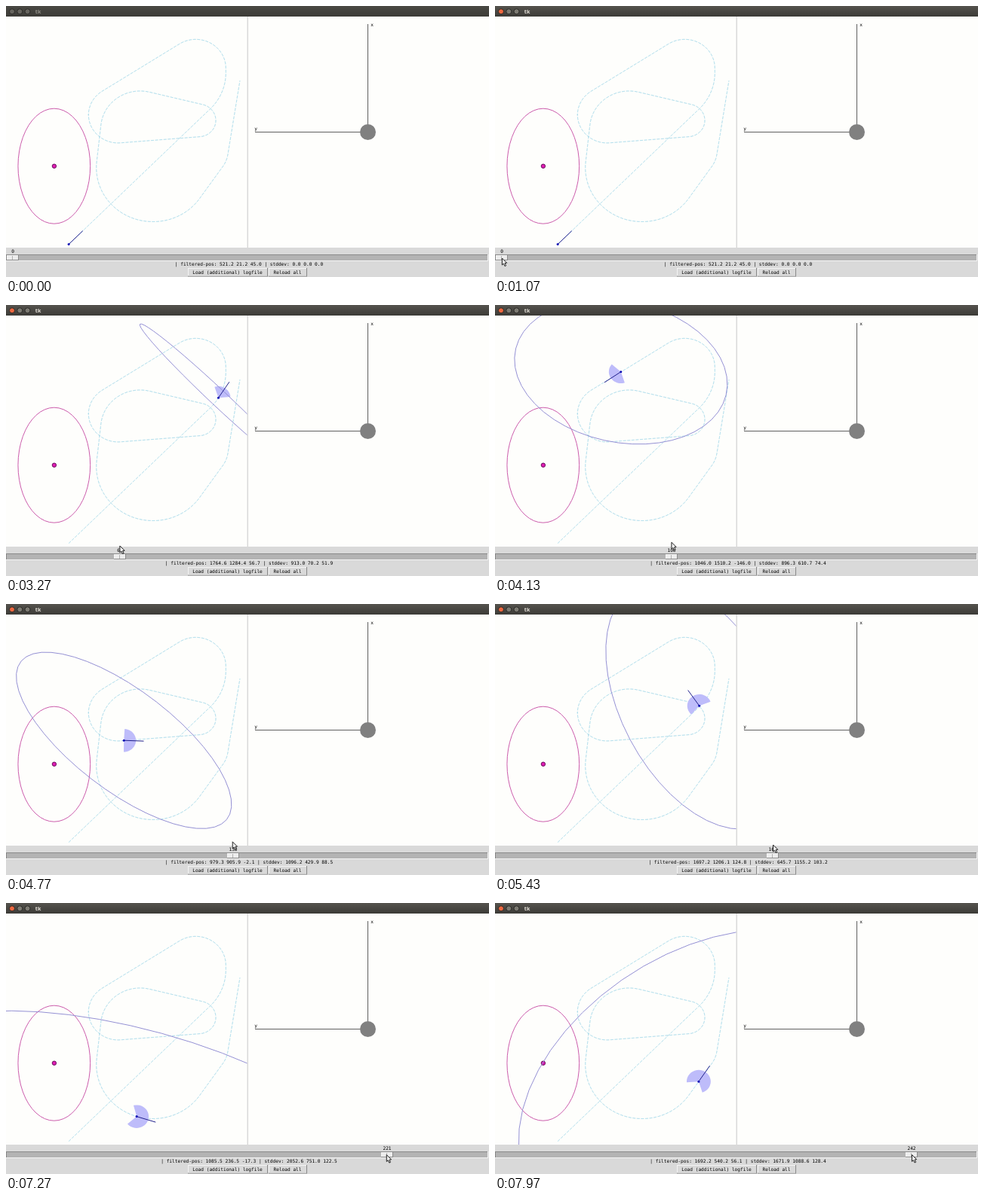
An HTML page with a canvas for the animation above (8000 ms loop, 640 by 360 pixels).

```html
<!DOCTYPE html>
<html lang="en">
<head>
<meta charset="utf-8">
<title>tk</title>
<style>
html, body { margin: 0; width: 100%; height: 100%; overflow: hidden; background: #d9d9d9; }
canvas { display: block; width: 640px; height: 360px; }
</style>
</head>
<body>
<canvas id="stage" width="640" height="360"></canvas>
<script>
const ctx = document.getElementById('stage').getContext('2d');
const LOOP = 8000, FOCUS = 870, ENTER = 380, GRAB = 1100;
const WIDTH = 155, GRAIN = 4;
const RAD = Math.PI / 180;
const MONO = '6.17px "DejaVu Sans Mono", monospace';
const FACE = '#d9d9d9', LIGHT = '#f4f4f4', SHADE = '#8a8a8a';

// Robot state at a few slider stops: pose is x, y, heading;
// spread is both axes of the error ellipse, its tilt, and the heading deviation
const KEYS = [
  { time: 1660, step: 12, pose: [521.2, 21.2, 45] },
  { time: 2030, step: 18, pose: [665.4, 165, 44.9], spread: [32.9, 23, -44.9, 17] },
  { time: 3270, step: 63, pose: [1764.6, 1284.4, 56.7], spread: [913, 70.2, -44.5, 51.9] },
  { time: 4130, step: 100, pose: [1046, 1510.2, -146], spread: [896.3, 610.7, -13, 74.4] },
  { time: 5430, step: 160, pose: [1697.2, 1206.1, 124.8], spread: [645.7, 1155.2, 26.8, 103.2] },
  { time: 6570, step: 199, pose: [767.3, 856.2, -96.4], spread: [614.1, 1444.9, 32, 116.1] },
  { time: 7970, step: 242, pose: [1692.2, 540.2, 56.1], spread: [1671.9, 1088.6, 36, 128.4] }
];

// Track corners on screen, each rounded by a left turn of the given radius in mm
const CORNERS = [
  [83.1, 316.6, 0], [291.3, 116.8, 440], [291.3, 12.7, 250], [109.3, 124.3, 246], [109.3, 185.1, 246],
  [278, 172, 142], [278, 135, 142], [132.4, 100.8, 327], [111, 286.5, 468], [234.3, 286.5, 468],
  [292.5, 206, 250], [310, 99, 0]
];

const toScreen = ([x, y]) => [x * .1595, 319.8 - y * .153];
const toWorld = ([x, y]) => [x / .1595, (319.8 - y) / .153];
const lerp = (a, b, u) => a + (b - a) * u;
const near = (a, period) => a - period * Math.round(a / period);
const dist = (p, q) => Math.hypot(q[0] - p[0], q[1] - p[1]);
const aim = (p, q) => Math.atan2(q[1] - p[1], q[0] - p[0]);
const polar = (p, r, a) => [p[0] + r * Math.cos(a), p[1] + r * Math.sin(a)];
const mul = (A, B) => A.map(r => B[0].map((_, j) => r.reduce((s, v, k) => s + v * B[k][j], 0)));
const flip = A => A[0].map((_, j) => A.map(r => r[j]));
const add = (A, B) => A.map((r, i) => r.map((v, j) => v + B[i][j]));

function ramp(keys, t) {
  if (t <= keys[0][0]) return keys[0][1];
  for (let i = 1; i < keys.length; i++) {
    const [t0, v0] = keys[i - 1], [t1, v1] = keys[i];
    if (t <= t1) return lerp(v0, v1, (t - t0) / (t1 - t0));
  }
  return keys[keys.length - 1][1];
}

function roundCorners(corners) {
  const pts = corners.map(toWorld), last = pts.length - 1, out = [pts[0]];
  for (let i = 1; i < last; i++) {
    const r = corners[i][2];
    const from = aim(pts[i - 1], pts[i]);
    const turn = near(aim(pts[i], pts[i + 1]) - from, 2 * Math.PI);
    const entry = polar(pts[i], -r * Math.tan(turn / 2), from);
    const hub = polar(entry, r, from + Math.PI / 2);
    for (let k = 0; k <= 24; k++) out.push(polar(hub, r, from - Math.PI / 2 + turn * k / 24));
  }
  return [...out, pts[last]];
}

// Points at even distances along a line
function resample(line, gap) {
  const out = [line[0]];
  let left = gap;
  for (let i = 1; i < line.length; i++) {
    const len = dist(line[i - 1], line[i]), a = aim(line[i - 1], line[i]);
    for (; left <= len; left += gap) out.push(polar(line[i - 1], left, a));
    left -= len;
  }
  return out;
}

// Kalman prediction for a two-wheeled robot
function predict(C, d, turn, dir) {
  const c = Math.cos(dir), s = Math.sin(dir);
  const slip = (.6 * turn * WIDTH) ** 2;
  const left = (.35 * (d - turn * WIDTH / 2)) ** 2 + slip;
  const right = (.35 * (d + turn * WIDTH / 2)) ** 2 + slip;
  const cross = (right - left) / (2 * WIDTH);
  const G = [[1, 0, -d * s], [0, 1, d * c], [0, 0, 1]];
  const V = [[c, -d / 2 * s], [s, d / 2 * c], [0, 1]];
  const N = [[(left + right) / 4, cross], [cross, (left + right) / WIDTH ** 2]];
  return add(mul(mul(G, C), flip(G)), mul(mul(V, N), flip(V)));
}

// Angle of the long axis, then logs of long axis, short axis and heading deviation
function shapeOf(C) {
  const mid = (C[0][0] + C[1][1]) / 2, diff = (C[0][0] - C[1][1]) / 2;
  const q = Math.hypot(diff, C[0][1]);
  return [Math.atan2(C[0][1], diff) / 2 / RAD,
    ...[mid + q, Math.max(mid - q, 1), C[2][2]].map(v => Math.log(v) / 2)];
}

function shapeOfSpread([a, b, tilt, dev]) {
  return [a >= b ? tilt : tilt + 90, ...[Math.max(a, b), Math.min(a, b), dev].map(Math.log)];
}

// The axis closer to x is listed first
function spreadOf([angle, long, short, dev]) {
  const axis = near(angle, 180), axes = [Math.exp(long), Math.exp(short)];
  return Math.abs(axis) <= 45 ? [...axes, axis, Math.exp(dev)]
    : [axes[1], axes[0], axis - 90 * Math.sign(axis), Math.exp(dev)];
}

const track = resample(roundCorners(CORNERS), GRAIN);
const states = simulate();

// Drives along the track, then eases the result onto the key states
function simulate() {
  let mark = 0;
  const marks = KEYS.map(({ step, pose }) => {
    for (let i = mark; i < track.length; i++) {
      if (dist(track[i], pose) < dist(track[mark], pose)) mark = i;
    }
    return [step, mark];
  });
  const start = KEYS[0].step, raw = [];
  let C = [[0, 0, 0], [0, 0, 0], [0, 0, 0]];
  for (let i = 0; i <= KEYS[KEYS.length - 1].step; i++) {
    const s = Math.round(ramp(marks, i)), p = track[s];
    const heading = aim(p, track[s + 1]) / RAD;
    if (i > start) {
      const q = raw[i - 1];
      C = predict(C, dist(q, p), near(heading - q[2], 360) * RAD, aim(q, p));
    }
    raw.push([...p, heading, ...shapeOf(C)]);
  }
  const fixes = KEYS.map(({ step, pose, spread }) => {
    const goal = [...pose, ...(spread ? shapeOfSpread(spread) : raw[step].slice(3))];
    return goal.map((v, j) => {
      const gap = v - raw[step][j] || 0;
      return j === 2 ? near(gap, 360) : j === 3 ? near(gap, 180) : gap;
    });
  });
  return raw.map((r, i) => {
    const v = r.map((x, j) => x + ramp(KEYS.map((key, k) => [key.step, fixes[k][j]]), i));
    return {
      p: v.slice(0, 2), heading: near(v[2], 360),
      spread: i > start ? spreadOf(v.slice(3)) : [0, 0, 0, 0]
    };
  });
}

const stepKeys = [[GRAB, 0], ...KEYS.map(k => [k.time, k.step])];
const knobX = step => 9.4 + 2.244 * step;

function box(x, y, w, h, color) {
  ctx.fillStyle = color;
  ctx.fillRect(x, y, w, h);
}

function relief(x, y, w, h, fill, top, bottom) {
  box(x, y, w, h, bottom);
  box(x, y, w - 1, h - 1, top);
  box(x + 1, y + 1, w - 2, h - 2, fill);
}

function label(str, x, y, align = 'center', color = '#000', font = MONO) {
  ctx.font = font;
  ctx.textAlign = align;
  ctx.fillStyle = color;
  ctx.fillText(str, x, y);
}

function shape(pts, { fill, edge, close = true }) {
  ctx.beginPath();
  pts.forEach(p => ctx.lineTo(p[0], p[1]));
  if (close) ctx.closePath();
  if (fill) { ctx.fillStyle = fill; ctx.fill(); }
  if (edge) { ctx.strokeStyle = edge; ctx.stroke(); }
}

function dot(x, y, r, fill, edge) {
  ctx.beginPath();
  ctx.arc(x, y, r, 0, 2 * Math.PI);
  ctx.fillStyle = fill;
  ctx.fill();
  if (edge) { ctx.strokeStyle = edge; ctx.stroke(); }
}

function ellipse(p, a, b, tilt) {
  return Array.from({ length: 48 }, (_, i) => {
    const w = 2 * Math.PI * i / 48;
    return toScreen(polar(polar(p, a * Math.cos(w), tilt * RAD), b * Math.sin(w), (tilt + 90) * RAD));
  });
}

function drawTitle(active) {
  const fade = ctx.createLinearGradient(0, 0, 0, 14);
  fade.addColorStop(0, active ? '#55534e' : '#4a4944');
  fade.addColorStop(1, '#3c3b37');
  box(0, 0, 640, 14, fade);
  [8, 18.3, 28.5].forEach((x, i) =>
    dot(x, 7.3, 3.5, active ? (i ? '#7c7a72' : '#ee6840') : '#66645e', '#2c2b28'));
  label('tk', 38.8, 10, 'left', active ? '#e4e0d8' : '#908e86', 'bold 7.2px "Open Sans", sans-serif');
}

function drawMap({ p, heading, spread: [a, b, tilt, dev] }) {
  box(0, 14, 640, 307, '#fefefc');
  box(319.5, 14, 1.5, 307, FACE);
  ctx.save();
  ctx.beginPath();
  ctx.rect(0, 14, 319.5, 307);
  ctx.clip();
  ctx.setLineDash([4, 1.6]);
  shape(track.map(toScreen), { edge: '#a0d8ea', close: false });
  ctx.setLineDash([]);
  shape(ellipse([400, 700], 300, 500, 0), { edge: '#cc5cac' });
  dot(63.9, 212.7, 2.7, '#e01cb4', '#641058');
  if (dev) {
    const fan = Array.from({ length: 25 }, (_, i) =>
      toScreen(polar(p, 100, (heading + dev * (i / 12 - 1)) * RAD)));
    shape([toScreen(p), ...fan], { fill: '#bebcfa' });
    shape(ellipse(p, a, b, tilt), { edge: '#9490d4' });
  }
  const here = toScreen(p);
  shape([here, toScreen(polar(p, 165, heading * RAD))], { edge: '#20208c', close: false });
  dot(...here, 1.5, '#0808b4');
  ctx.restore();
}

function drawAxes() {
  shape([[479.5, 24], [479.5, 167.5], [330, 167.5]], { edge: '#606060', close: false });
  dot(479.5, 167.5, 10.5, '#808080');
  label('x', 485, 27);
  label('y', 331, 165);
}

function drawControls(step, { p, heading, spread: [a, b, , dev] }) {
  box(0, 321, 640, 39, FACE);
  relief(0, 330, 639, 9, '#b3b3b3', SHADE, LIGHT);
  const x = Math.round(knobX(step));
  relief(x - 8, 331, 16, 7, '#ececec', LIGHT, SHADE);
  box(x - 1, 332, 1, 5, '#b0b0b0');
  label(step, x, 328.4);
  const nums = (...v) => v.map(n => n.toFixed(1)).join(' ');
  label(`| filtered-pos: ${nums(...p, heading)} | stddev: ${nums(a, b, dev)}`, 322, 345.4);
  relief(241, 348, 106, 11.5, FACE, LIGHT, SHADE);
  relief(348, 348, 51, 11.5, FACE, LIGHT, SHADE);
  label('Load (additional) logfile', 293.5, 355.8);
  label('Reload all', 373, 355.8);
}

function drawCursor(t, pos) {
  const away = ramp([[ENTER, 1], [FOCUS, 0]], t);
  const sway = Math.cos(2 * Math.PI * Math.max(0, t - GRAB) / 6500);
  const x = knobX(pos) + 50 * away, y = 325 + 10 * sway + 29 * away;
  const arrow = [[0, 0], [0, 9], [2, 7.2], [3.6, 10.6], [5.2, 9.9], [3.7, 6.6], [6.3, 6.3]];
  shape(arrow.map(([u, v]) => [x + u, y + v]), { fill: '#f0f0f0', edge: '#202020' });
}

function draw(now) {
  const t = now % LOOP, pos = ramp(stepKeys, t), step = Math.round(pos);
  drawMap(states[step]);
  drawAxes();
  drawTitle(t >= FOCUS);
  drawControls(step, states[step]);
  if (t > ENTER) drawCursor(t, pos);
  requestAnimationFrame(draw);
}
draw(0);
</script>
</body>
</html>
```
